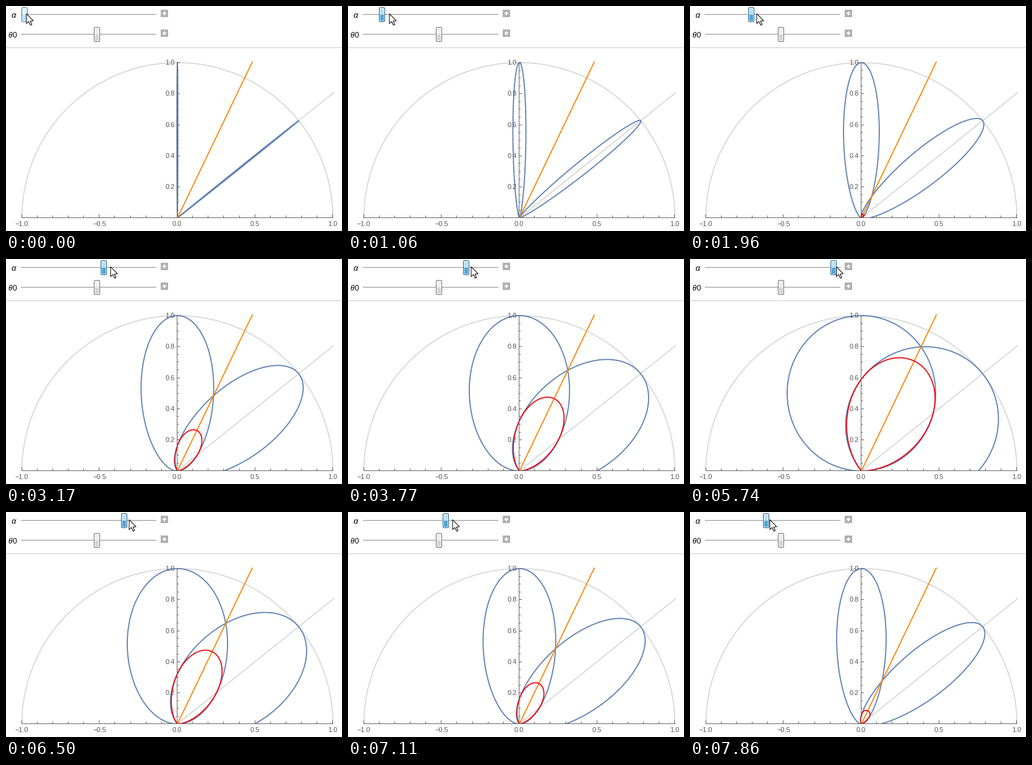
A matplotlib script for the animation above (8 s loop, 543x364 px).

```python
import numpy as np
import matplotlib.pyplot as plt
from matplotlib.animation import FuncAnimation
from matplotlib.collections import LineCollection
from matplotlib.patches import FancyBboxPatch, Polygon, Rectangle

W, H, DPI = 543, 364, 64
PX = 72 / DPI                      # points per pixel
LOOP, INTERVAL = 8000, 20

OX, OY, UNIT = 276.5, 342.4, 251.3
THETA0 = 0.8943                    # second lobe, measured from the vertical
BLUE, ORANGE, RED = "#5e81b5", "#ff8000", "#f00a14"
PALE, AXIS, LABEL = "#d9d9d9", "#666666", "#555555"

# The drag advances in even steps, rests at the far end, then retraces itself
START, RETURN, LAST_STEP = 290, 5440, 32
STEP_MS, RETURN_MS = 150.7, 150
KEY_STEPS = [0, 7, 15, 20, 29, LAST_STEP]
THUMB_X = [30, 59, 123, 158, 232, 236.7]
MOUSE_X = [32.5, 72, 128.5, 168.5, 236, 241]

fig = plt.figure(figsize=(W / DPI, H / DPI), dpi=DPI, facecolor="white")
ax = fig.add_axes([0, 0, 1, 1])
ax.set_xlim(-0.5, W - 0.5)
ax.set_ylim(H - 0.5, -0.5)
ax.axis("off")
plot_area = Rectangle((24.5, 89.5), 504.5, 253.5, transform=ax.transData)


def to_px(theta, r):
    """Polar point (angle from the vertical) to stage pixels."""
    return OX + UNIT * r * np.sin(theta), OY - UNIT * r * np.cos(theta)


def curve(color, width, z, theta=(), r=()):
    line, = ax.plot(*to_px(np.asarray(theta), np.asarray(r)), color=color,
                    lw=width * PX, zorder=z, solid_capstyle="butt",
                    solid_joinstyle="round")
    line.set_clip_path(plot_area)
    return line


def rect(x, y, w, h, color, z):
    """Fill whole pixels, counted from the top left one."""
    patch = Rectangle((x - 0.5, y - 0.5), w, h, fc=color, ec="none", zorder=z,
                      antialiased=False)
    ax.add_patch(patch)
    return patch


def label(x, y, text, size=11, color=LABEL, ha="center", **kw):
    ax.text(x, y, text, fontsize=size * PX, color=color, ha=ha,
            va="center_baseline", family="Liberation Sans", zorder=7, **kw)


class Thumb:
    """Slider handle: rounded box, light above and darker below."""

    def __init__(self, x, y, z):
        self.y = y
        self.box = FancyBboxPatch((0, 0), 1, 1, lw=PX, zorder=z,
                                  boxstyle="round,pad=0,rounding_size=2")
        ax.add_patch(self.box)
        self.top = rect(0, y - 9, 6, 9, "white", z + 0.1)
        self.low = rect(0, y, 6, 10, "white", z + 0.1)
        self.move(x)

    def move(self, x):
        self.box.set_bounds(x - 5, self.y - 12, 9, 23)
        self.top.set_x(x - 3.5)
        self.low.set_x(x - 3.5)

    def paint(self, edge, face, top, low):
        self.box.set(edgecolor=edge, facecolor=face)
        self.top.set_facecolor(top)
        self.low.set_facecolor(low)


def draw_controls():
    for y in (13, 45):
        rect(24, y, 219, 1, "#a0a0a0", 1)
        rect(24, y + 1, 219, 1, "#e4e4e4", 1)
        rect(250, y - 7, 12, 12, "#b0b0b0", 1)
        rect(253, y - 2, 6, 2, "white", 2)
        rect(255, y - 4, 2, 6, "white", 2)
    label(11.5, 14, "α", 13, "black", style="italic")
    label(6.5, 46, "θ", 12, "black", style="italic")
    label(13, 46, "0", 12, "black")
    rect(0, 67, W, 1, "#cccccc", 1)


def draw_axes():
    rect(25, 342, 504, 1, AXIS, 6)
    rect(276, 91, 1, 252, AXIS, 6)
    for k in range(-10, 11):
        size = 5 if k % 5 == 0 else 3
        rect(int(OX + UNIT * k / 10), 342 - size, 1, size, AXIS, 6)
    for k in range(1, 21):
        size = 5 if k % 4 == 0 else 3
        rect(276, round(OY - UNIT * k / 20), size, 1, AXIS, 6)
    for v in np.arange(-1, 1.1, 0.5):
        label(OX - 0.5 + UNIT * v, 351.8, f"{v:.1f}".replace("-", "−"))
    for v in np.arange(0.2, 1.1, 0.2):
        label(272.4, OY - UNIT * v - 0.5, f"{v:.1f}", ha="right")


def lobe(theta, alpha):
    """Microfacet distribution times cosine, with its peak scaled to one."""
    c = np.maximum(np.cos(theta), 0)
    a2 = alpha * alpha
    return a2 * a2 * c / (1 - (1 - a2) * c * c) ** 2


def steps_since(t, start, length):
    return max(0, int((t - start) // length) + 1)


draw_controls()
draw_axes()
arc = np.linspace(-np.pi / 2, np.pi / 2, 300)
curve(PALE, 1.8, 2, arc, np.ones_like(arc))
curve(PALE, 1.8, 2, [THETA0] * 2, [0, 2])
curve(ORANGE, 1.7, 4, [THETA0 / 2] * 2, [0, 2])
upright, tilted = curve(BLUE, 1.8, 3), curve(BLUE, 1.8, 3)
product = curve(RED, 1.8, 5)

Thumb(147, 46, 3).paint("#707070", "#f6f6f6", "#efefef", "#d6d6d6")
thumb = Thumb(30, 14, 3)
ARROW = np.array([(0, 0), (0, 16), (3.7, 12.6), (6.5, 18.6), (8.8, 17.6),
                  (6.2, 11.8), (11.2, 11.4)])
mouse = Polygon(ARROW, fc="white", ec="black", lw=PX, zorder=9, joinstyle="miter")
ax.add_patch(mouse)

SPREAD = np.linspace(-np.pi / 2 + 1e-4, np.pi / 2 - 1e-4, 241)
OVERLAP = np.linspace(THETA0 - np.pi / 2, np.pi / 2, 300)


def update(frame):
    t = (frame + 0.5) * INTERVAL
    pos = (min(LAST_STEP, steps_since(t, START, STEP_MS))
           - steps_since(t, RETURN, RETURN_MS))

    x = np.interp(pos, KEY_STEPS, THUMB_X)
    alpha = min(1, 0.0095 + (x - 30) * 0.00479)
    thumb.move(round(x))
    if pos == 0:
        thumb.paint("#3c7fb1", "#eef8fe", "#dff2fc", "#b4e0f8")
    else:
        thumb.paint("#2c628b", "#d6eefa", "#b9e0f5", "#4fa6d6")
    mouse.set_xy(ARROW + (np.interp(pos, KEY_STEPS, MOUSE_X), 12))

    theta = np.arctan(alpha * np.tan(SPREAD))   # denser where the lobe is narrow
    r = lobe(theta, alpha)
    upright.set_data(*to_px(theta, r))
    tilted.set_data(*to_px(theta + THETA0, r))
    both = lobe(OVERLAP, alpha) * lobe(OVERLAP - THETA0, alpha)
    product.set_data(*to_px(OVERLAP, both))
    return upright, tilted, product, mouse


anim = FuncAnimation(fig, update, frames=LOOP // INTERVAL, interval=INTERVAL,
                     repeat=True, repeat_delay=0, blit=False)
plt.show()
```
